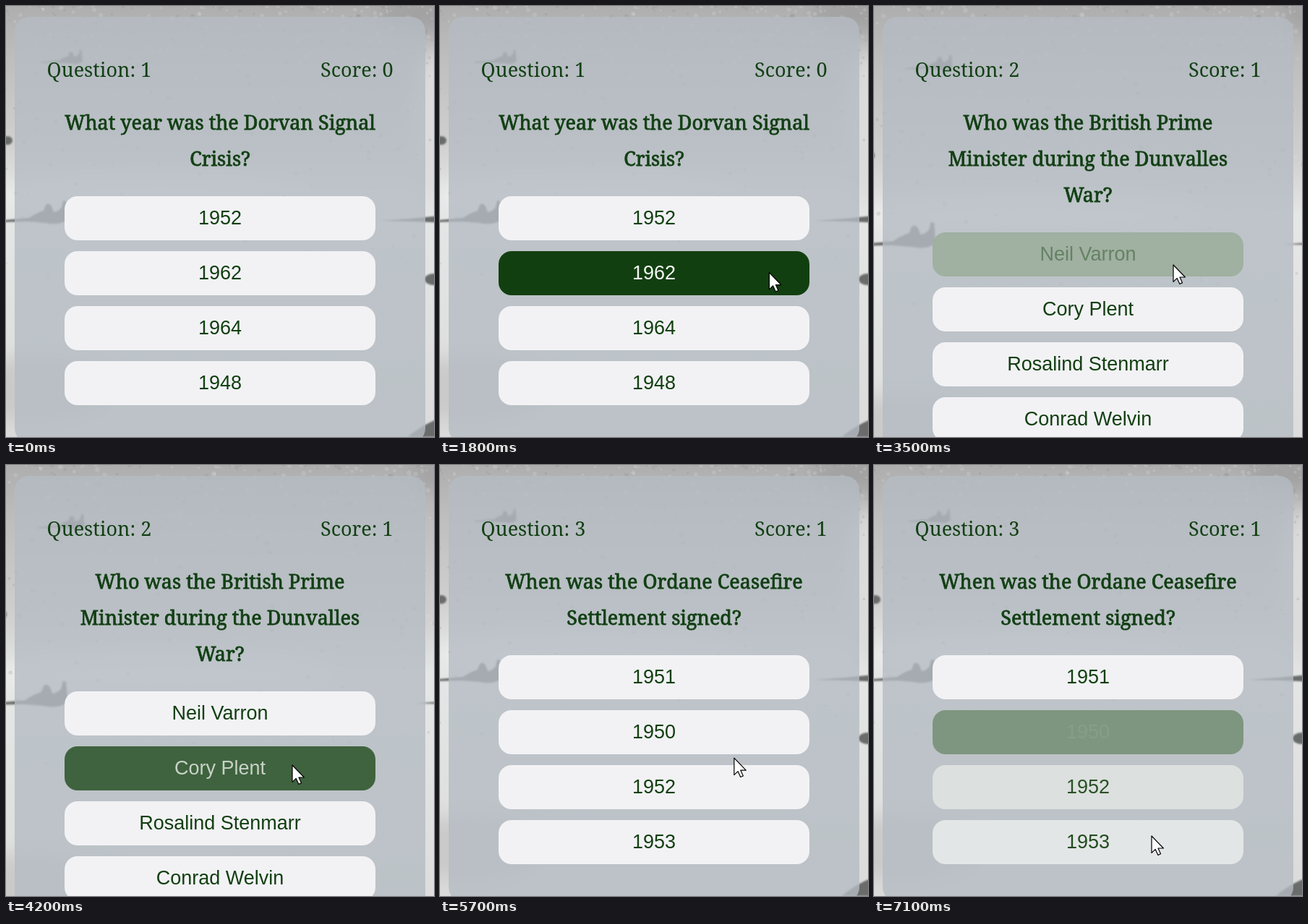
Recreate the animation shown at these times as an HTML page. Size 592 px wide and 596 px high, loop 7200 ms.

```html
<!DOCTYPE html>
<html lang="en">
<head>
<meta charset="utf-8">
<title>History quiz</title>
<style>
  html, body { margin: 0; width: 100%; height: 100%; overflow: hidden; background: #c4c4c4; }
  svg { display: block; width: 592px; height: 596px; }
  .serif { font: 27px "Noto Serif", serif; fill: #123f14; }
  .title { stroke: #123f14; stroke-width: .8px; text-anchor: middle; }
  .answer { font: 27px "Liberation Sans", Arial, sans-serif; text-anchor: middle; }
</style>
</head>
<body>
<svg viewBox="0 0 592 596">
  <defs>
    <linearGradient id="sky" x2="0" y2="1">
      <stop offset="0" stop-color="#aeaeae"/>
      <stop offset=".12" stop-color="#bebebe"/>
      <stop offset=".32" stop-color="#d0d0d0"/>
      <stop offset=".44" stop-color="#e5e6e6"/>
      <stop offset="1" stop-color="#dadbda"/>
    </linearGradient>
    <filter id="soft" x="-30%" y="-60%" width="160%" height="220%"><feGaussianBlur stdDeviation="12"/></filter>
    <filter id="edge" x="-20%" y="-60%" width="140%" height="220%"><feGaussianBlur stdDeviation="1"/></filter>
    <path id="plane" d="M-64 9 L-20 5 Q-10 -2 0 -5 L3 -13 Q7 -17 11 -11 L14 -3 Q21 -4 25 -10 L27 -19 L31 -18 L33 8 Q20 16 3 12 L-22 10 L-64 11Z"/>
  </defs>

  <g id="scene">
    <rect width="610" height="596" fill="url(#sky)"/>
    <g filter="url(#soft)">
      <ellipse cx="210" cy="262" rx="210" ry="28" fill="#ededed"/>
      <ellipse cx="592" cy="170" rx="30" ry="110" fill="#dcdcdc"/>
      <ellipse cx="40" cy="530" rx="110" ry="45" fill="#cacaca"/>
      <ellipse cx="592" cy="10" rx="80" ry="24" fill="#a2a2a2"/>
    </g>
    <g id="grain"></g>
    <g filter="url(#edge)" fill="#6a6c6c">
      <use href="#plane" x="52" y="288"/>
      <use href="#plane" transform="translate(86 72) scale(.6)"/>
      <ellipse cx="2" cy="186" rx="7" ry="6"/>
      <path d="M518 297 L560 294 L610 289 V300 L565 298Z"/>
      <ellipse cx="592" cy="378" rx="13" ry="8"/>
      <path d="M556 596 Q576 578 610 566 V596Z"/>
    </g>
  </g>

  <rect id="panel" x="12" y="15" width="568" rx="20" fill="#b5bcc2" fill-opacity=".8"/>
  <text id="count" class="serif" x="56.5" y="98"></text>
  <text id="score" class="serif" x="535.5" y="98" text-anchor="end"></text>
  <g id="titles"></g>
  <g id="answers"></g>
  <path id="cursor" d="M0 0 V23.4 L5.2 18.4 L8.9 26.4 L12.5 24.8 L9 17 H16.4 Z"
        fill="#fff" stroke="#000" stroke-width="1.2" stroke-linejoin="round"/>
</svg>
<script>
const LOOP = 7200, STEP = 100, FADE = 600;
const LIGHT = [242, 242, 245], DARK = [18, 63, 16], WHITE = [245, 247, 245];
const BUTTON = { x: 81, width: 430, height: 61, rx: 18 }, PITCH = 76;

const questions = [
  { from: 0, title: ['What year was the Dorvan Signal', 'Crisis?'],
    answers: ['1952', '1962', '1964', '1948'],
    click: { at: 2300, answer: 1, color: [0, 128, 0] } },
  { from: 3280, title: ['Who was the British Prime', 'Minister during the Dunvalles', 'War?'],
    answers: ['Neil Varron', 'Cory Plent', 'Rosalind Stenmarr', 'Conrad Welvin'],
    click: { at: 4700, answer: 1, color: [254, 0, 0] } },
  { from: 5700, title: ['When was the Ordane Ceasefire', 'Settlement signed?'],
    answers: ['1951', '1950', '1952', '1953'] }
];

// Where the pointer turns or rests
const stops = [
  { t: 500, x: 600, y: 420 }, { t: 650, x: 510, y: 398 }, { t: 1000, x: 464, y: 387 },
  { t: 2300, x: 450, y: 357 }, { t: 3300, x: 450, y: 357 }, { t: 3500, x: 414, y: 358 },
  { t: 3900, x: 396, y: 415 }, { t: 5600, x: 396, y: 415 }, { t: 6200, x: 461, y: 356 },
  { t: 6600, x: 461, y: 356 }, { t: 6880, x: 432, y: 415 }, { t: 7100, x: 384, y: 513 }
];

const $ = id => document.getElementById(id);
const mix = (a, b, k) => a.map((v, i) => v + (b[i] - v) * k);
const rgb = c => `rgb(${c.map(Math.round).join(',')})`;
const topOf = (q, i) => 163 + 50 * q.title.length + PITCH * i;

function add(parent, tag, attrs) {
  const el = document.createElementNS('http://www.w3.org/2000/svg', tag);
  for (const key in attrs) el.setAttribute(key, attrs[key]);
  return parent.appendChild(el);
}

function pointer(t) {
  const i = stops.findIndex(s => s.t > t);
  if (i < 0) return stops[stops.length - 1];
  if (i === 0) return stops[0];
  const a = stops[i - 1], b = stops[i], k = (t - a.t) / (b.t - a.t);
  return { x: a.x + (b.x - a.x) * k, y: a.y + (b.y - a.y) * k };
}

// Replays the pointer since the question appeared: fades in inside a button, out elsewhere
function hoverLevels(q, t) {
  const levels = q.answers.map(() => 0), dt = 10;
  for (let s = q.from; s < t; s += dt) {
    const { x, y } = pointer(s);
    levels.forEach((v, i) => {
      const dx = x - BUTTON.x, dy = y - topOf(q, i);
      const inside = dx >= 0 && dx <= BUTTON.width && dy >= 0 && dy <= BUTTON.height;
      levels[i] = Math.min(1, Math.max(0, v + (inside ? dt : -dt) / FADE));
    });
  }
  return levels;
}

// Seeded speckle, denser towards the top
let seed = 7;
const random = () => (seed = seed * 16807 % 2147483647) / 2147483647;
for (let i = 0; i < 500; i++) {
  add($('grain'), 'circle', {
    cx: random() * 600, cy: 420 * random() ** 2, r: 1 + 2 * random(),
    fill: random() < .5 ? '#888' : '#e4e4e4', opacity: .2
  });
}

const titles = [0, 1, 2].map(i =>
  add($('titles'), 'text', { class: 'serif title', x: 296, y: 171 + 50 * i }));
const buttons = questions[0].answers.map(() => ({
  box: add($('answers'), 'rect', BUTTON),
  label: add($('answers'), 'text', { class: 'answer', x: 296 })
}));

let shown;

function showQuestion(q) {
  const extra = q.title.length - 2;
  shown = q;
  $('count').textContent = 'Question: ' + (questions.indexOf(q) + 1);
  titles.forEach((el, i) => el.textContent = q.title[i] || '');
  buttons.forEach(({ box, label }, i) => {
    box.setAttribute('y', topOf(q, i));
    label.setAttribute('y', topOf(q, i) + 39);
    label.textContent = q.answers[i];
  });
  // A taller panel enlarges the backdrop
  $('panel').setAttribute('height', 589 + 50 * extra);
  $('scene').setAttribute('transform', `translate(${-9 * extra}) scale(${1 + .11 * extra})`);
}

function render(t) {
  const q = questions.filter(q => t >= q.from).pop();
  if (q !== shown) showQuestion(q);
  $('score').textContent = 'Score: ' + (t >= questions[0].click.at ? 1 : 0);

  const levels = hoverLevels(q, t);
  buttons.forEach(({ box, label }, i) => {
    const clicked = q.click && q.click.answer === i && t >= q.click.at;
    box.setAttribute('fill', rgb(clicked ? q.click.color : mix(LIGHT, DARK, levels[i])));
    label.setAttribute('fill', rgb(clicked ? WHITE : mix(DARK, WHITE, levels[i])));
  });

  const { x, y } = pointer(t);
  $('cursor').setAttribute('transform', `translate(${x} ${y})`);
  $('cursor').style.display = t > stops[0].t ? '' : 'none';
}

const start = performance.now();
function tick() {
  const t = (performance.now() - start) % LOOP;
  render(Math.floor(t / STEP) * STEP);
  requestAnimationFrame(tick);
}
tick();
</script>
</body>
</html>
```
